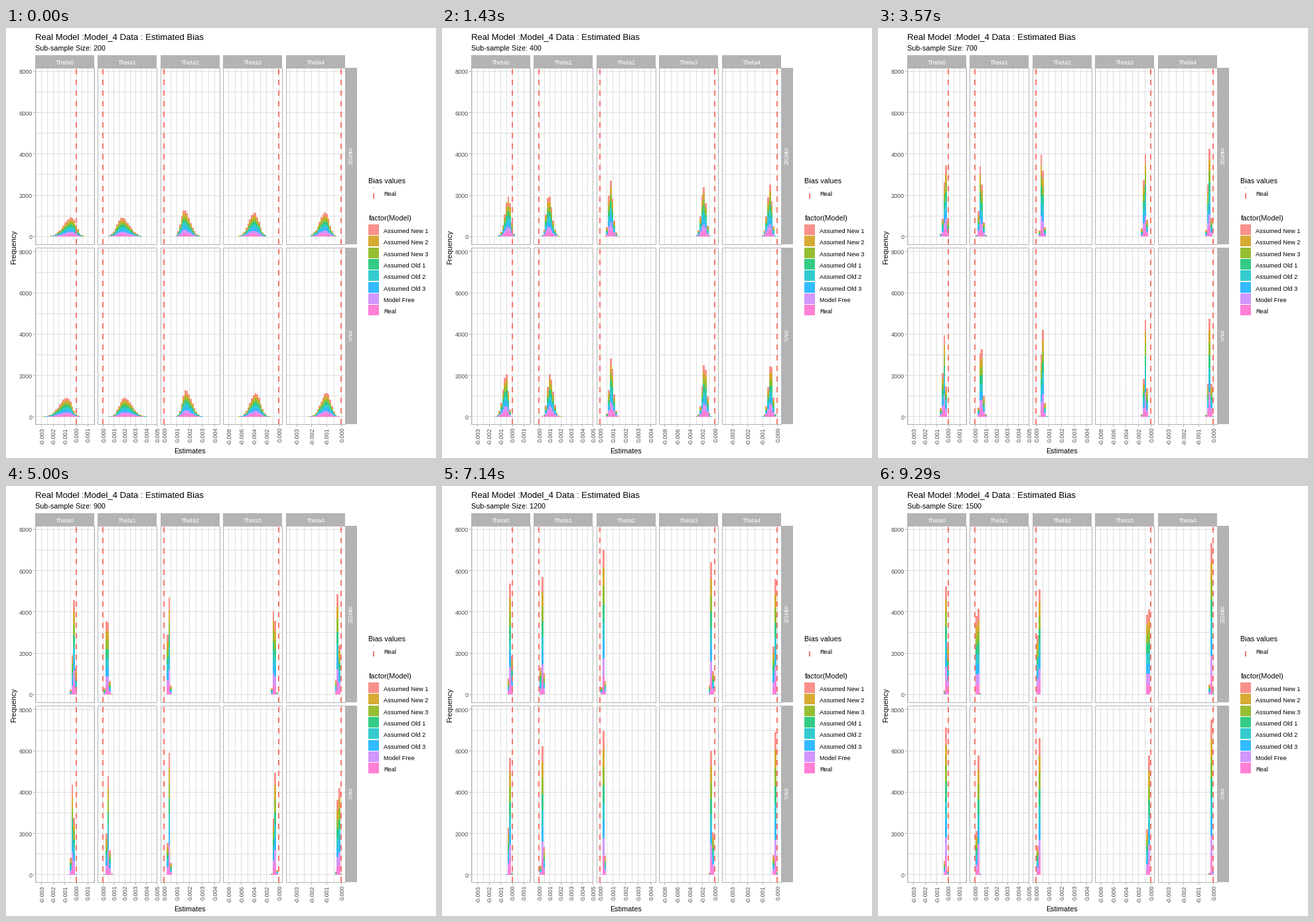
Write a matplotlib script that moves like this. It is 648 px wide and 648 px high and loops after 10 s.

```python
import math
from itertools import product

import matplotlib.pyplot as plt
import numpy as np
from matplotlib.animation import FuncAnimation
from matplotlib.collections import PolyCollection
from matplotlib.colors import to_rgba

plt.rcParams["font.family"] = "Liberation Sans"

W = H = 648
LOOP_MS, FRAMES, STEPS = 10000, 100, 14
GREY, GRID, RED, DARK = "#b3b3b3", "#dedede", "#f8766d", "#4d4d4d"
BIN = 2.7            # bar width in pixels
Y_SCALE = 0.0311     # pixels per count
SAMPLES = 1000       # estimates per model
PANEL_W, PANEL_H = 89, 266

MODELS = {
    "Assumed New 1": "#f8766d", "Assumed New 2": "#cd9600",
    "Assumed New 3": "#7cae00", "Assumed Old 1": "#00be67",
    "Assumed Old 2": "#00bfc4", "Assumed Old 3": "#00a9ff",
    "Model Free": "#c77cff", "Real": "#ff61cc",
}


class Row:
    def __init__(self, name, top, base, power):
        self.name, self.top, self.base = name, top, base
        self.power = power      # how fast the spread shrinks with sample size

    def y(self, count):
        return self.base - count * Y_SCALE


class Column:
    def __init__(self, i, zero, step, value, ticks, bias, curve, spread, skew):
        self.name = f"Theta{i}"
        self.left = round(44 + 94.45 * i)
        self.zero, self.step, self.value, self.ticks = zero, step, value, ticks
        self.bias = bias        # bias times sample size, one per row
        self.curve = curve      # extra bias at small samples
        self.spread = spread    # spread at sample size 200
        self.skew = skew


ROWS = [Row("mMSE", 60, 314.22, 1.12), Row("mVc", 331, 585.75, 1.2)]
COLS = [
    Column(0, 106, 17.4, .001, (-3, 1), (-860, -1400), 400, 3.4, 0.3),
    Column(1, 146.5, 16.27, .001, (0, 5), (2140, 2420), 0, 3.45, -0.2),
    Column(2, 238.5, 19.04, .001, (0, 4), (2270, 2425), 0, 2.45, -0.25),
    Column(3, 411.5, 18.9, .002, (-4, 0), (-2090, -1900), -650, 2.75, 0.1),
    Column(4, 505.5, 22.4, .001, (-3, 0), (-1360, -1140), -410, 2.7, 0.2),
]

fig = plt.figure(figsize=(W / 72, H / 72), dpi=72, facecolor="white")
ax = fig.add_axes([0, 0, 1, 1])
ax.set_xlim(0, W)
ax.set_ylim(H, 0)
ax.axis("off")


def layer(z):
    polys = PolyCollection([], linewidths=0, antialiaseds=False, zorder=z)
    return ax.add_collection(polys, autolim=False)


class Boxes:
    """Collects rectangles and shows them in one layer."""

    def __init__(self):
        self.verts, self.colors = [], []

    def add(self, x, y, w, h, color, alpha=1):
        self.verts.append([(x, y), (x + w, y), (x + w, y + h), (x, y + h)])
        self.colors.append(to_rgba(color, alpha))

    def show(self, target):
        target.set_verts(self.verts)
        target.set_facecolor(self.colors)


def text(x, y, s, size, color="black", ha="left", rot=0):
    return ax.text(x, y, s, fontsize=size, color=color, ha=ha, va="baseline",
                   rotation=rot, rotation_mode="anchor", zorder=6)


back, front = Boxes(), Boxes()


def dashes(x, top, bottom):
    for y in range(bottom, top, -16):
        end = max(top, y - 8)
        front.add(int(x) - 1, end, 2, y - end, RED)


def draw_panel(col, row):
    left, top = col.left, row.top
    for count in range(0, 8001, 1000):
        back.add(left, int(row.y(count)), PANEL_W, 1, GRID)
    for i in range(2 * col.ticks[0] - 1, 2 * col.ticks[1] + 2):
        x = int(col.zero + i * col.step / 2)
        if left < x < left + PANEL_W:
            back.add(x, top, 1, PANEL_H, GRID)
    dashes(col.zero, top, top + PANEL_H)
    for edge in (0, PANEL_H):
        front.add(left, top + edge, PANEL_W + 1, 1, GREY)
    for edge in (0, PANEL_W):
        front.add(left + edge, top, 1, PANEL_H + 1, GREY)


def draw_column_labels(col):
    back.add(col.left, 41, PANEL_W, 20, GREY)
    text(col.left + 44.5, 55, col.name, 9, "white", "center")
    for t in range(col.ticks[0], col.ticks[1] + 1):
        x = col.zero + t * col.step
        back.add(int(x), 598, 1, 3, GREY)
        text(x + 3.7, 602, f"{t * col.value:.3f}", 9, DARK, "right", 90)


def draw_row_labels(row):
    back.add(511, row.top, 18, PANEL_H, GREY)
    text(514.5, row.top + 133, row.name, 9, "white", "center", -90)
    for count in range(0, 8001, 2000):
        y = row.y(count)
        back.add(41, int(y), 3, 1, GREY)
        text(39.5, y + 4, str(count), 9, DARK, "right")


def draw_legend():
    text(546, 234, "Bias values", 10.9)
    dashes(554, 240, 257)
    text(569, 253, "Real", 9.2)
    text(546.5, 290, "factor(Model)", 10.9)
    for i, (name, color) in enumerate(MODELS.items()):
        y = 296.15 + 17.28 * i
        back.add(546, round(y), 16, 15.6, color, 0.8)
        text(569, y + 13, name, 9.2)


erf = np.vectorize(math.erf)


def skew_cdf(x, mode, spread, skew):
    """Two half normals of different width joined at the mode."""
    side = np.where(x < mode, 1 + skew, 1 - skew)
    return (1 + skew) / 2 + side * erf((x - mode) / (spread * side * 2 ** 0.5)) / 2


def add_bars(boxes, c, r, size):
    col, row = COLS[c], ROWS[r]
    ratio = 200 / size
    mode = (col.bias[r] + col.curve * ratio) / size
    spread = col.spread * ratio ** row.power
    zero = col.zero - 0.5
    lo = math.ceil((col.left + 3 - zero) / BIN)
    hi = math.floor((col.left + PANEL_W - 3 - zero) / BIN)
    edges = np.arange(lo, hi + 2) - 0.5
    rng = np.random.default_rng(size + 10 * c + r)
    stack = np.zeros(len(edges) - 1)
    for color in reversed(MODELS.values()):
        shift = 0.08 * spread * rng.normal()
        share = np.diff(skew_cdf(edges, mode + shift, spread, col.skew))
        count = SAMPLES * np.maximum(share, 0)
        count += 0.4 * np.sqrt(count) * rng.normal(size=len(count))
        count[count < 0.5] = 0
        for edge, low, n in zip(edges, stack, count):
            if n:
                boxes.add(zero + edge * BIN, row.y(low + n), BIN, n * Y_SCALE,
                          color, 0.8)
        stack += count


def make_scene(size):
    boxes = Boxes()
    for c, r in product(range(len(COLS)), range(len(ROWS))):
        add_bars(boxes, c, r, size)
    return boxes


text(43.5, 17, "Real Model :Model_4 Data : Estimated Bias", 13.1)
text(277, 641, "Estimates", 10.7, ha="center")
text(15.5, 330, "Frequency", 10.9, ha="center", rot=90)
for col, row in product(COLS, ROWS):
    draw_panel(col, row)
for col in COLS:
    draw_column_labels(col)
for row in ROWS:
    draw_row_labels(row)
draw_legend()
back.show(layer(1))
front.show(layer(4))

subtitle = text(43.5, 34, "", 10.75)
bars = layer(3)
sizes = [200 + 100 * i for i in range(STEPS)]
scenes = [make_scene(size) for size in sizes]


def update(i):
    step = ((i + 1) * STEPS - 1) // FRAMES
    subtitle.set_text(f"Sub-sample Size: {sizes[step]}")
    scenes[step].show(bars)
    return bars, subtitle


anim = FuncAnimation(fig, update, frames=FRAMES, interval=LOOP_MS / FRAMES,
                     repeat=True, repeat_delay=0, blit=False)
plt.show()
```
